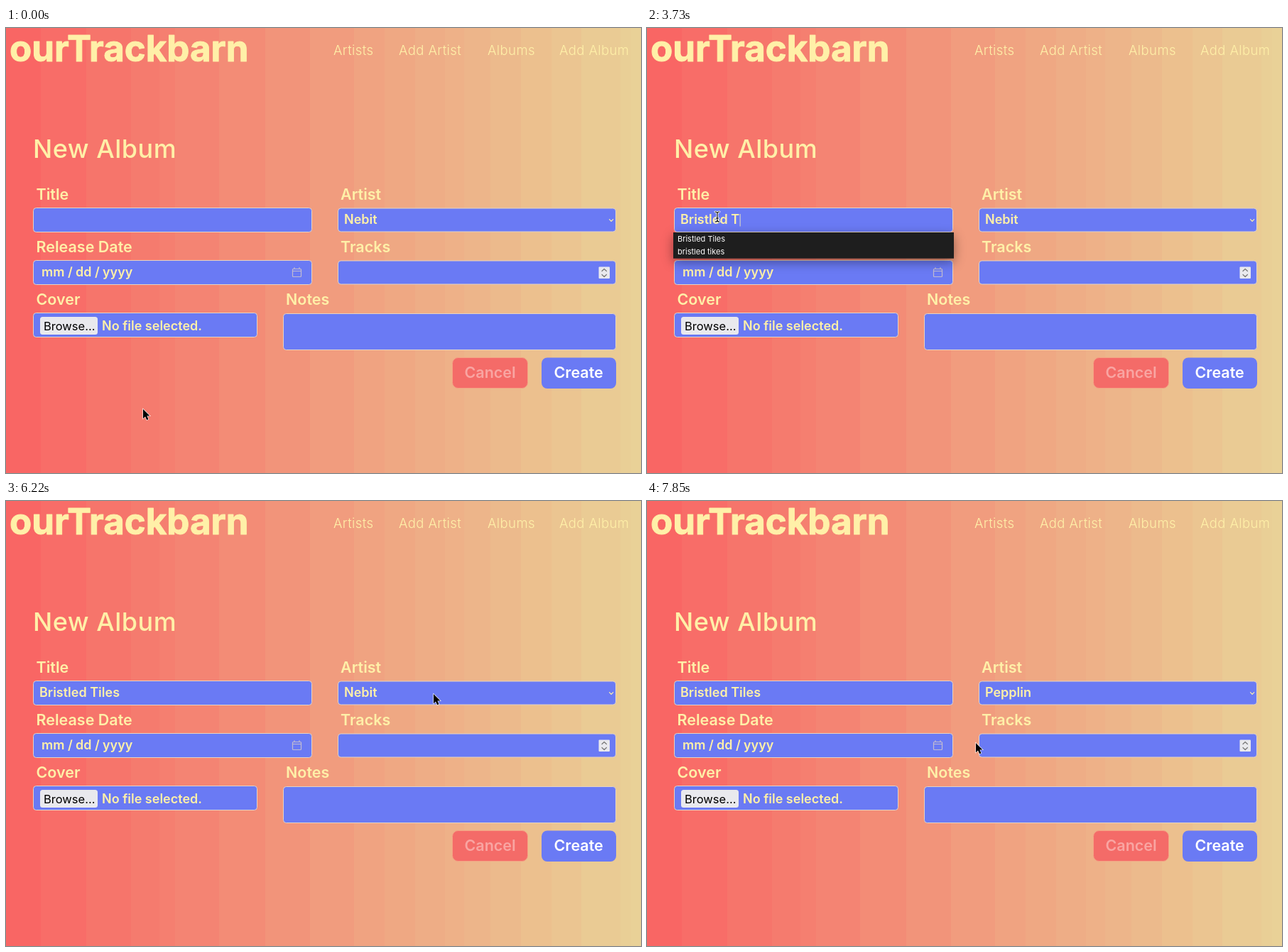
An HTML page that plays this animation: 894 by 627 pixels, repeating every 7990 ms.

```html
<!DOCTYPE html>
<html lang="en">
<head>
<meta charset="utf-8">
<title>New Album</title>
<style>
  html, body { margin: 0; width: 100%; height: 100%; overflow: hidden; }
  svg { display: block; width: 100%; height: 100%; font-family: Inter, sans-serif; }
  text { white-space: pre; fill: #fff0a8; }
  .brand { font-size: 51px; font-weight: 700; stroke: #fff0a8; stroke-width: 1; stroke-linejoin: round; }
  .nav { font-size: 18.5px; font-weight: 300; letter-spacing: .4px; }
  .heading { font-size: 36px; font-weight: 500; letter-spacing: .5px; }
  .label { font-size: 21.5px; font-weight: 600; }
  .value { font-size: 18px; font-weight: 600; }
  .browse { font-size: 16.5px; fill: #000; }
  .hint { font-size: 11px; fill: #fff; }
  .option { font-size: 17px; fill: #000; }
  .selected { fill: #fff; }
  .field { fill: #6a7af4; stroke: #e3d3c6; }
  .line { fill: none; stroke-linecap: round; stroke-linejoin: round; }
  #hints { filter: drop-shadow(0 5px 8px rgba(0, 0, 0, .4)); }
  #menu { filter: drop-shadow(0 3px 4px rgba(0, 0, 0, .4)); }
</style>
</head>
<body>
<svg viewBox="0 0 894 627" preserveAspectRatio="none">
  <defs>
    <linearGradient id="menuFill" x2="0" y2="1">
      <stop stop-color="#d7cde2"/><stop offset="1" stop-color="#e5d2e5"/>
    </linearGradient>
  </defs>
  <g id="bands" shape-rendering="crispEdges"></g>
  <g id="page"></g>

  <path class="line" stroke="#c3bcd0" stroke-width="1.2" d="M403.5 340.5q0-1 1-1h10q1 0 1 1v9q0 1-1 1h-10q-1 0-1-1zM403.5 342.5h12M406 337.5v2M413 337.5v2"/>
  <rect x="834.5" y="336.5" width="15.5" height="16.5" rx="1" fill="#e9e9ed"/>
  <path class="line" stroke="#777" stroke-width="1.2" d="M839 342.5l3.2-3 3.2 3M839 347.5l3.2 3 3.2-3"/>
  <path class="line" stroke="#fff0a8" stroke-width="1.2" d="M849.5 269.7l2.6 2.6 2.6-2.6"/>
  <rect x="48" y="407" width="81" height="25" rx="3.5" fill="#e9e9ed"/>
  <text class="browse" x="53" y="426">Browse...</text>

  <text id="artist" class="value" x="476" y="276"></text>
  <text id="typed" class="value" x="47" y="276"></text>
  <rect id="caret" y="262" width="1" height="17.5" fill="#e8dfc0"/>
  <g id="hints"></g>
  <g id="menu"></g>
  <path id="arrow" d="M0 0V13.2L3 10.4L5.2 15.2L7.5 14.2L5.4 9.5H9.5Z" fill="#000" stroke="#fff" stroke-width="1.2" paint-order="stroke"/>
  <g id="beam" class="line">
    <path id="beamShape" stroke="#fff" stroke-width="2.6" d="M-3-7Q0-7 0-5Q0-7 3-7M0-5V5M-3 7Q0 7 0 5Q0 7 3 7M-1.5 2H1.5"/>
    <use href="#beamShape" style="stroke:#000"/>
    <path stroke="#000" stroke-width="1.1" d="M-3-7Q0-7 0-5Q0-7 3-7M0-5V5M-3 7Q0 7 0 5Q0 7 3 7M-1.5 2H1.5"/>
  </g>
</svg>
<script>
const LOOP = 7990;
const TITLE = "Bristled Tiles";
const HINTS = ["Bristle Tiles", TITLE, "bristle tiles", "bristled tikes"];
const ARTISTS = ["Nebit", "Tactile Kettle Orchestra", "Marrowick Tam", "Pepplin", "Corin Wetherbourn"];
const PICK = 3;

const el = id => document.getElementById(id);
const rect = (x, y, w, h, attrs) => `<rect x="${x}" y="${y}" width="${w}" height="${h}" ${attrs}/>`;
const text = (cls, x, y, str) => `<text class="${cls}" x="${x}" y="${y}">${str}</text>`;
const field = (x, y, w, h) => rect(x, y, w, h, 'class="field" rx="4"');

// Backdrop: a left-to-right gradient in visible bands
const edges = [0, 49, 113, 176, 216, 238, 300, 365, 428, 490, 533, 576, 618, 645, 682, 725, 768, 810, 865, 880, 894];
const left = [249, 99, 99], right = [233, 210, 151];
el("bands").innerHTML = edges.slice(1).map((end, i) => {
  const mix = (edges[i] + end) / 2 / 894;
  const color = left.map((c, k) => Math.round(c + (right[k] - c) * mix));
  return rect(edges[i], 0, end - edges[i], 627, `fill="rgb(${color})"`);
}).join("");

el("page").innerHTML = [
  text("brand", 5, 47, "ourTrackbarn"),
  text("nav", 461, 38, "Artists"), text("nav", 553, 38, "Add Artist"),
  text("nav", 678, 38, "Albums"), text("nav", 779, 38, "Add Album"),
  text("heading", 38, 183, "New Album"),
  text("label", 42.5, 242, "Title"), text("label", 471, 242, "Artist"),
  text("label", 42.5, 316, "Release Date"), text("label", 471, 316, "Tracks"),
  text("label", 42.5, 390, "Cover"), text("label", 394, 390, "Notes"),
  field(38.5, 253.5, 392, 34), field(467.5, 254, 391, 33),
  field(38.5, 327.5, 392, 34), field(467.5, 328, 391, 33),
  field(38.5, 401.5, 315, 34), field(390.5, 402.5, 468, 51),
  text("value", 50, 350, "mm"), text("value", 87, 350, "/"), text("value", 98, 350, "dd"),
  text("value", 125, 350, "/"), text("value", 136, 350, "yyyy"),
  text("value", 135, 426, "No file selected."),
  rect(628.5, 464.5, 106, 43, 'rx="8" fill="#f46b68" stroke="#f5a184"'),
  rect(754, 464.5, 105, 43.5, 'rx="8" fill="#6a7af4"'),
  '<text class="label" x="645.5" y="493" style="fill:#f9a5a2">Cancel</text>',
  '<text class="label" x="771.5" y="493" style="fill:#fff">Create</text>'
].join("");

// Timelines hold [time, value] pairs; each value stays until the next time
const spread = (start, end, values) =>
  values.map((v, i) => [start + (end - start) * i / Math.max(1, values.length - 1), v]);
const at = (line, t) => line.findLast(([time]) => time <= t)[1];

const pointer = [
  [0, [193, 537]],
  ...spread(450, 1050, [[183, 490], [150, 385], [114, 290], [98, 253], [99, 266]]),
  ...spread(4590, 5036, [[113, 300], [152, 400], [196, 480], [217, 506]]),
  ...spread(5470, 6220, [[228, 495], [325, 415], [455, 330], [560, 280], [598, 266], [602, 272]]),
  ...spread(6820, 7261, [[597, 291], [591, 310], [588, 329], [587, 337]]),
  ...spread(7555, 7850, [[560, 339], [503, 341], [463, 341]])
];
const typedLength = [
  [0, 0], [2100, 1], [2690, 2],
  ...spread(2990, 4020, [3, 4, 6, 7, 9, 10, 11, 13]), [4170, 14]
];
const caretOn = [[0, 0], [1200, 1], [1800, 0], [2100, 1], [4747, 0], [5036, 1], [5180, 0]];
const hintOpacity = [[0, 0], [2250, .7], [2400, 1], [5180, 0]];
const menuRow = [[0, -1], [6370, 0], ...spread(6820, 7114, [1, 2, PICK]), [7408, -1]];

function hintList(typed) {
  const rows = HINTS.filter(h => h.toLowerCase().startsWith(typed.toLowerCase()));
  return rect(37, 288, 395, 1.5 + rows.length * 17.6, 'fill="#1e1e1e"') +
    rows.map((h, i) => text("hint", 43, 301 + i * 17.6, h)).join("");
}

function menuList(active) {
  const check = `<path class="line" stroke="${active ? "#000" : "#fff"}" stroke-width="1.8" d="M473 266.5l3.5 4 6.5-10"/>`;
  return rect(466, 248, 394, 132, 'rx="5" fill="url(#menuFill)"') +
    rect(467, 252.6 + active * 24.5, 392, 24.5, 'fill="#338cf5"') + check +
    ARTISTS.map((name, i) =>
      text(i === active ? "option selected" : "option", 489, 271.5 + i * 24.5, name)).join("");
}

function draw() {
  const t = performance.now() % LOOP;
  const typed = TITLE.slice(0, at(typedLength, t));
  el("typed").textContent = typed;
  el("caret").setAttribute("x", 47 + (typed ? el("typed").getComputedTextLength() + .5 : 0));
  el("caret").style.opacity = at(caretOn, t);
  el("artist").textContent = ARTISTS[t < 7408 ? 0 : PICK];

  const opacity = at(hintOpacity, t);
  el("hints").innerHTML = opacity ? hintList(typed) : "";
  el("hints").style.opacity = opacity;
  const row = at(menuRow, t);
  el("menu").innerHTML = row < 0 ? "" : menuList(row);

  const [x, y] = at(pointer, t);
  const overTitle = x > 38 && x < 431 && y >= 253 && y < 288;
  for (const [id, shown] of [["arrow", !overTitle], ["beam", overTitle]]) {
    el(id).setAttribute("transform", `translate(${x} ${y})`);
    el(id).style.display = shown ? "" : "none";
  }
  requestAnimationFrame(draw);
}
draw();
</script>
</body>
</html>
```
